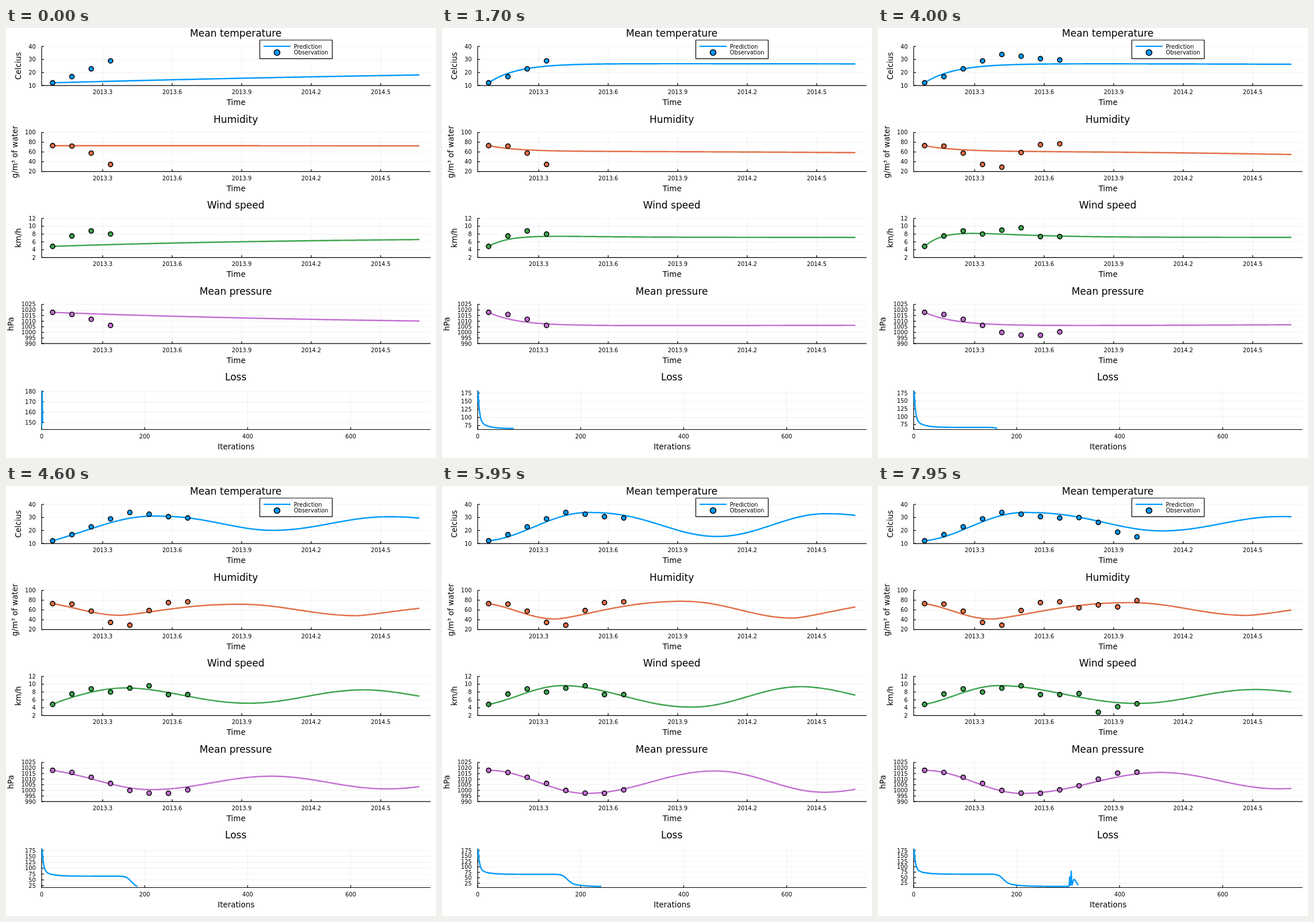
These frames come from a looping animation (748 by 748 pixels, 8000 ms). An HTML page with a canvas:

```html
<!DOCTYPE html>
<html>
<head>
<meta charset="utf-8">
<style>
  html, body { margin: 0; height: 100%; overflow: hidden; background: #fff; }
  canvas { display: block; }
</style>
</head>
<body>
<canvas id="stage" width="748" height="748"></canvas>
<script>
const ctx = document.getElementById('stage').getContext('2d');
const LEFT = 62, RIGHT = 738.5, MID = (LEFT + RIGHT) / 2;
const TOP = 32, ROW = 149.6, HEIGHT = 68.1;
const X0 = 81.1, MONTH = 33.58, MONTHS = 19;
const FRAME_MS = 50, FRAMES = 160, STAGE_ITERATIONS = 150;
const BLUE = '#009afa';

// slow, settle, drift, bump: the first, non-periodic predictions.
// peakMonth, peak, troughs, bend, lead: the later seasonal predictions.
const panels = [
  { title: 'Mean temperature', unit: 'Celcius', unitX: 25.5, color: BLUE,
    min: 10, max: 40, step: 10, kick: 1,
    observed: [12.1, 16.8, 22.8, 28.9, 33.8, 32.5, 30.6, 29.6, 29.9, 26.2, 18.7, 15.1],
    slow: 36, settle: 26.8, drift: -.5, bump: 0,
    peakMonth: 5.15, peak: 33.8, troughs: [16.4, 14.3, 19.7], bend: 1.18, lead: .08 },
  { title: 'Humidity', unit: 'g/m³ of water', unitX: 19.5, color: '#e36f47',
    min: 20, max: 100, step: 20, kick: -.5,
    observed: [72.9, 72, 57.6, 34.5, 28.9, 58.8, 75, 76.7, 64.5, 70.3, 66.2, 79.2],
    slow: 600, settle: 61.3, drift: -6.5, bump: 0,
    peakMonth: 3.48, peak: 41.5, troughs: [78.6, 77.3, 75], bend: .7, lead: .15 },
  { title: 'Wind speed', unit: 'km/h', unitX: 25.5, color: '#3ea44e',
    min: 2, max: 12, step: 2, kick: .5,
    observed: [4.85, 7.5, 8.8, 8, 9, 9.6, 7.35, 7.35, 7.6, 2.85, 4.25, 5],
    slow: 13.5, settle: 7.15, drift: 0, bump: 4.5,
    peakMonth: 3.87, peak: 9.65, troughs: [3.93, 4.28, 5.1], bend: .95, lead: .18 },
  { title: 'Mean pressure', unit: 'hPa', unitX: 13, color: '#c371d2',
    min: 990, max: 1025, step: 5, kick: -.5,
    observed: [1017.9, 1016, 1011.7, 1006.2, 999.9, 997.5, 997.4, 1000.4, 1004.1, 1010, 1015.4, 1016.2],
    slow: 18, settle: 1006, drift: .8, bump: 0,
    peakMonth: 5.06, peak: 997.3, troughs: [1016.3, 1018.4, 1016], bend: 1, lead: 0 },
];

const clamp = v => Math.max(0, Math.min(1, v));
const mix = (a, b, w) => a + (b - a) * w;
const ease = u => (1 - Math.cos(Math.PI * u)) / 2;
const fade = (x, length) => Math.exp(-x / length);

function relaxing(panel, month, length, tilt) {
  const { settle, drift, bump, observed: [start] } = panel;
  return mix(settle, start, fade(month, length)) +
    tilt * (drift * (month / MONTHS) ** 2 + bump * (fade(month, 2.8) - fade(month, 1)));
}

// Half waves from the first value to a peak, a trough, a damped peak and back.
function seasonal(panel, month, season, fall, rise, damping) {
  const { peakMonth, peak, bend, lead, observed: [start] } = panel;
  const trough = panel.troughs[season];
  const secondPeak = mix(trough, peak, damping);
  const afterPeak = month - peakMonth, afterTrough = afterPeak - fall, afterSecond = afterTrough - rise;
  if (afterPeak < 0) {
    const first = ease(lead);
    return mix(start, peak, (ease(mix(lead, 1, month / peakMonth)) - first) / (1 - first));
  }
  if (afterTrough < 0) return mix(peak, trough, ease((afterPeak / fall) ** bend));
  if (afterSecond < 0) return mix(trough, secondPeak, ease(afterTrough / rise));
  return mix(secondPeak, trough, ease((afterSecond / fall) ** bend));
}

const poses = [
  { at: 2, value: (p, m) => relaxing(p, m, p.slow, 0) },
  { at: 34, value: (p, m) => relaxing(p, m, 1.45, .2) },
  { at: 162, value: (p, m) => relaxing(p, m, 1.55, 1) },
  { at: 212, value: (p, m) => seasonal(p, m, 0, 6.25, 6, .95) },
  { at: 280, value: (p, m) => seasonal(p, m, 1, 7, 5.35, .95) },
  { at: 320, value: (p, m) => seasonal(p, m, 2, 7.15, 6.1, .78) },
];

function lossAt(i) {
  if (i === 0) return 144.4;
  const descent = 88 * fade(i - 1, 2.6) + 26 * fade(i - 1, 15);
  const drop = 42 / (1 + Math.exp((i - 173) / 4.5)) + 15 * Math.min(1, fade(i - 178, 24));
  const spike = (center, height) => height * Math.exp(-(((i - center) / .7) ** 2));
  const rebound = Math.max(0, i - 307) / 4.5;
  return 9 + descent + drop + spike(303, 44) + spike(306, 70) + 33 * (rebound * Math.exp(1 - rebound)) ** 2;
}
const losses = Array.from({ length: 2 * FRAMES + 1 }, (_, i) => lossAt(i));

// Predictions move between poses in step with the falling loss.
function predictor(iteration) {
  const last = poses.length - 2;
  let index = 0;
  while (index < last && poses[index + 1].at <= iteration) index++;
  const from = poses[index], to = poses[index + 1];
  const restart = iteration - 2 * STAGE_ITERATIONS;
  const remaining = (losses[iteration] - losses[to.at]) / (losses[from.at] - losses[to.at]);
  const w = index === last ? clamp(restart / 20) : 1 - clamp(remaining) ** .6;
  const kick = restart <= 0 ? 0
    : Math.sqrt(clamp((losses[iteration] - 16) / 63)) * (restart < 9 ? .19 : -.13);
  return (panel, month) => mix(from.value(panel, month), to.value(panel, month), w) +
    kick * panel.kick * (panel.max - panel.min) * (1 - fade(month, 1.9));
}

function text(str, x, y, size, align = 'center', angle = 0) {
  ctx.save();
  ctx.translate(x, y);
  ctx.rotate(angle);
  ctx.font = `${size}px "DejaVu Sans", sans-serif`;
  ctx.textAlign = align;
  ctx.fillStyle = '#000';
  ctx.fillText(str, 0, 0);
  ctx.restore();
}

function line(points, color, width) {
  ctx.beginPath();
  points.forEach(([x, y]) => ctx.lineTo(x, y));
  ctx.strokeStyle = color;
  ctx.lineWidth = width;
  ctx.lineJoin = 'round';
  ctx.stroke();
}

function marker(x, y, radius, color) {
  ctx.beginPath();
  ctx.arc(x, y, radius, 0, 2 * Math.PI);
  ctx.fillStyle = color;
  ctx.fill();
  ctx.strokeStyle = '#000';
  ctx.lineWidth = 1.6;
  ctx.stroke();
}

function axes(top, title, xLabel, xTicks, yTicks) {
  const bottom = top + HEIGHT;
  const grid = 'rgba(0,0,0,.08)';
  for (const [x] of xTicks) line([[x, top], [x, bottom]], grid, .8);
  for (const [y] of yTicks) line([[LEFT, y], [RIGHT, y]], grid, .8);
  line([[LEFT, top], [LEFT, bottom], [RIGHT, bottom]], '#000', 1.2);
  for (const [x, label] of xTicks) {
    line([[x, bottom], [x, bottom - 4]], '#000', 1.2);
    text(label, x, top + 83.1, 9.8);
  }
  for (const [y, label] of yTicks) {
    line([[LEFT, y], [LEFT + 4, y]], '#000', 1.2);
    text(label, 51.8, y + 3.6, 9.8, 'right');
  }
  text(title, MID - .6, top - 17, 17.1);
  text(xLabel, MID, top + 102.2, 13.45);
}

function ticks(min, max, step, position) {
  const result = [];
  for (let v = Math.ceil(min / step) * step; v <= max; v += step) result.push([position(v), String(v)]);
  return result;
}

const yearTicks = Array.from({ length: 5 }, (_, i) => [168.2 + i * 120.9, (2013.3 + i * .3).toFixed(1)]);

function drawPanel(panel, row, predict, count) {
  const top = TOP + row * ROW;
  const xOf = month => X0 + month * MONTH;
  const yOf = v => top + HEIGHT * (panel.max - v) / (panel.max - panel.min);
  axes(top, panel.title, 'Time', yearTicks, ticks(panel.min, panel.max, panel.step, yOf));
  text(panel.unit, panel.unitX, top + HEIGHT / 2, 13.45, 'center', -Math.PI / 2);
  const curve = [];
  for (let i = 0; i <= MONTHS * 10; i++) curve.push([xOf(i / 10), yOf(predict(panel, i / 10))]);
  line(curve, panel.color, 2.44);
  panel.observed.slice(0, count).forEach((v, i) => marker(xOf(i), yOf(v), 4, panel.color));
}

function drawLoss(iteration) {
  const top = TOP + 4 * ROW;
  const shown = losses.slice(0, iteration + 1);
  const low = Math.min(...shown), high = Math.max(...shown), pad = .03 * (high - low);
  const min = low - pad, max = high + pad, range = max - min;
  const xOf = i => LEFT + i * .896;
  const yOf = v => top + HEIGHT * (max - v) / range;
  const step = range < 50 ? 10 : range < 90 ? 20 : 25;
  axes(top, 'Loss', 'Iterations', ticks(0, 600, 200, xOf), ticks(min, max, step, yOf));
  ctx.save();
  ctx.beginPath();
  ctx.rect(LEFT - .5, top, RIGHT - LEFT, HEIGHT);
  ctx.clip();
  line(shown.map((v, i) => [xOf(i), yOf(v)]), BLUE, 2.44);
  ctx.restore();
}

function drawLegend() {
  ctx.fillStyle = '#fff';
  ctx.fillRect(441.5, 21, 126, 32.3);
  ctx.strokeStyle = '#000';
  ctx.lineWidth = 1.2;
  ctx.strokeRect(441.5, 21, 126, 32.3);
  line([[448, 31.9], [495, 31.9]], BLUE, 2.44);
  marker(471.5, 42.7, 5, BLUE);
  text('Prediction', 500.8, 35.6, 9.8, 'left');
  text('Observation', 500.8, 46.4, 9.8, 'left');
}

function draw() {
  const frame = Math.floor(performance.now() / FRAME_MS) % FRAMES;
  const iteration = 2 * frame + 2;
  const count = 4 * Math.ceil(iteration / STAGE_ITERATIONS);
  const predict = predictor(iteration);
  ctx.fillStyle = '#fff';
  ctx.fillRect(0, 0, 748, 748);
  panels.forEach((panel, row) => drawPanel(panel, row, predict, count));
  drawLoss(iteration);
  drawLegend();
  requestAnimationFrame(draw);
}
draw();
</script>
</body>
</html>
```
